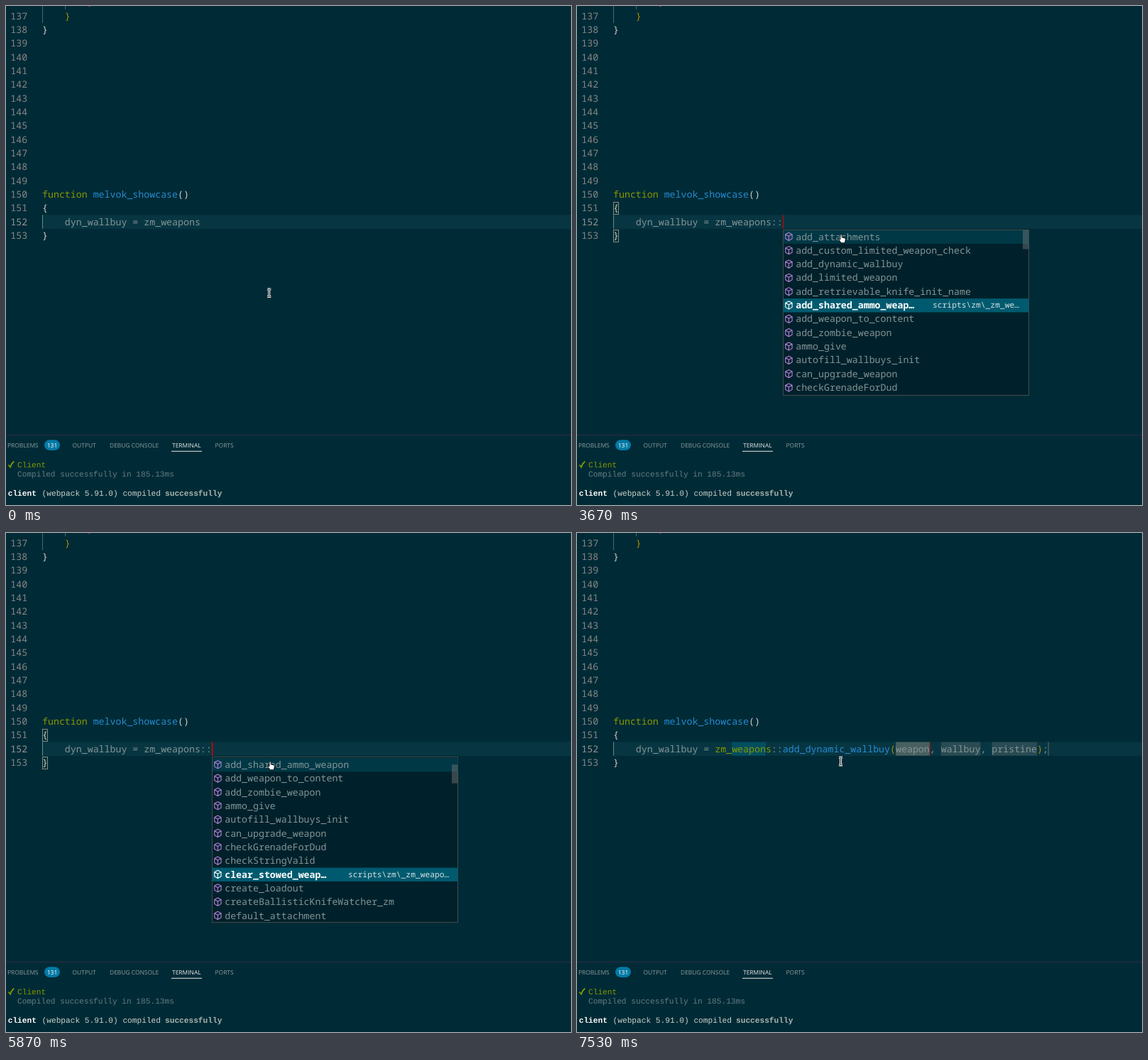
An HTML page for the animation above (8 s loop, 796 px wide and 703 px high).

```html
<!DOCTYPE html>
<html lang="en">
<head>
<meta charset="utf-8">
<title>Editor autocomplete</title>
<style>
  html, body { margin: 0; width: 100%; height: 100%; overflow: hidden; background: #002b36; }
  svg { display: block; }
  text { white-space: pre; text-rendering: geometricPrecision; }
  .code { font: 13.27px "Noto Sans Mono", monospace; fill: #839496; }
  .term { font: 11.17px "Liberation Mono", monospace; }
  .tab { font: 8.45px "Open Sans", sans-serif; fill: #8b9ca0; }
  .detail { font: 11.3px "Noto Sans Mono", monospace; fill: #d5e0e3; }
  .bold { font-weight: bold; }
  .icon { fill: none; stroke: #b180d7; stroke-width: 1.1; stroke-linejoin: round; }
  .row .back, .row .detail, .row .more { visibility: hidden; }
  .hover .back { visibility: visible; fill: #003846; }
  .picked .back { visibility: visible; fill: #005a6f; }
  .picked .code { fill: #fff; font-weight: bold; }
  .picked .icon { stroke: #fff; }
  .picked .detail { visibility: visible; }
  .picked.hover .more { visibility: visible; }
</style>
</head>
<body>
<svg id="stage" width="796" height="703" viewBox="0 0 796 703" xmlns="http://www.w3.org/2000/svg">
  <clipPath id="view"><rect x="291" y="316" width="345.5" height="232.5"/></clipPath>
</svg>
<script>
const LOOP = 8000, LEFT = 51, CHAR = 7.962, LINE = 19.33;
const LIST_TOP = 315.5, VIEW = 12 * LINE + 1.4;
const stage = document.getElementById('stage');
const GREY = '#839496', GREEN = '#859900', BLUE = '#268bd2', GOLD = '#b58900', PALE = '#cdcdcd';

function add(parent, tag, attrs = {}, content) {
  const el = document.createElementNS('http://www.w3.org/2000/svg', tag);
  for (const key in attrs) el.setAttribute(key, attrs[key]);
  if (content !== undefined) el.textContent = content;
  parent.append(el);
  return el;
}
const group = (parent, attrs) => add(parent, 'g', attrs);
const rect = (parent, x, y, width, height, fill, more) =>
  add(parent, 'rect', { x, y, width, height, fill, ...more });
const write = (parent, x, y, cls, content, fill) =>
  add(parent, 'text', { x, y, class: cls, ...(fill && { style: `fill:${fill}` }) }, content);
const show = (el, on) => el.setAttribute('visibility', on ? 'visible' : 'hidden');
const colX = col => LEFT + col * CHAR;
const lineTop = n => 294.5 + (n - 152) * LINE;

// A line of code made of [text, colour] runs
function codeLine(parent, n, col, runs) {
  const line = write(parent, colX(col), lineTop(n) + 14.2, 'code', '');
  for (const [content, fill] of runs) add(line, 'tspan', { style: `fill:${fill}` }, content);
  return line;
}

// Editor
rect(stage, LEFT, 294.3, 745, 19.6, '#073642');
for (let n = 137; n <= 153; n++)
  write(stage, 6.3, lineTop(n) + 14.2, 'code', n, n === 152 ? '#949494' : '#858585');
rect(stage, LEFT, 0, 1, 24, '#49666b');
rect(stage, 83, 0, 1, 4.5, '#49666b');
rect(stage, LEFT, 294.3, 1, 19.6, '#648b8e');

const boxes = group(stage, { fill: '#00640022', stroke: '#888' });
for (const n of [151, 153])
  add(boxes, 'rect', { x: 51.5, y: Math.round(lineTop(n)) + 1.5, width: 7, height: 17 });

codeLine(stage, 136, 8, [['}', '#d33682']]);
codeLine(stage, 137, 4, [['}', GOLD]]);
codeLine(stage, 138, 0, [['}', PALE]]);
codeLine(stage, 150, 0, [['function ', GREEN], ['melvok_showcase', BLUE], ['()', PALE]]);
codeLine(stage, 151, 0, [['{', PALE]]);
codeLine(stage, 153, 0, [['}', PALE]]);

const typed = write(stage, colX(4), lineTop(152) + 14.2, 'code', '');

// Inserted call with its placeholders
const call = group(stage);
const mark = (col, len, fill) => rect(call, colX(col), 294.5, len * CHAR, 19.2, fill);
const twin = mark(21, 6, '#024e60');
mark(50, 6, '#48605f');
mark(58, 7, '#2a4b53');
mark(67, 8, '#2a4b53');
rect(call, 663.6, 294.5, 1, 19.2, '#686d6d');
codeLine(call, 152, 4, [
  ['dyn_wallbuy = ', GREY], ['zm_weapons', GREEN], ['::', GREY], ['add_dynamic_wallbuy', BLUE],
  ['(', GOLD], ['weapon, wallbuy, pristine', GREY], [')', GOLD], [';', GREY]
]);

const caret = rect(stage, 0, 294.5, 1.6, 19.3, '#d30102');

// Panel
rect(stage, 0, 604, 796, 1, '#2b2b4a');
const tabs = [[2, 'PROBLEMS'], [93.5, 'OUTPUT'], [146, 'DEBUG CONSOLE'], [234, 'TERMINAL'], [294.5, 'PORTS']];
for (const [x, name] of tabs)
  write(stage, x, 621.7, 'tab', name, name === 'TERMINAL' ? '#e7e7e7' : '');
rect(stage, 233, 626.8, 43, 1, '#e7e7e7');
rect(stage, 54, 611.3, 22, 14.6, '#047aa6', { rx: 7.3 });
write(stage, 65, 621.8, 'tab', '131', '#fff').setAttribute('text-anchor', 'middle');

add(stage, 'path', { d: 'M3.5 646.5l2.5 3.2q1.5-5 5.2-8.2', fill: 'none', stroke: GREEN, 'stroke-width': 1.7 });
write(stage, 16, 649.6, 'term', 'Client', GREEN);
write(stage, 16, 663, 'term', 'Compiled successfully in 185.13ms', '#657b83');
write(stage, 2.7, 690, 'term bold', 'client', '#fff');
write(stage, 50.6, 690, 'term', '(webpack 5.91.0) compiled', '#c9d0cb');
write(stage, 224, 690, 'term bold', 'successfully', '#a9b5b0');

// Suggestion list
const names = `add_attachments add_custom_limited_weapon_check add_dynamic_wallbuy add_limited_weapon
  add_retrievable_knife_init_name add_shared_ammo_weapon add_weapon_to_content add_zombie_weapon
  ammo_give autofill_wallbuys_init can_upgrade_weapon checkGrenadeForDud checkStringValid
  clear_stowed_weapon create_loadout createBallisticKnifeWatcher_zm default_attachment`.split(/\s+/);
const PATH = 'scripts\\zm\\_zm_weapons';
const cut = (s, room) => s.length <= room ? s : s.slice(0, Math.max(0, Math.floor(room) - 1)) + '…';

const popup = group(stage);
rect(popup, 290.5, 315.5, 346, 233, '#00212b', { stroke: '#414a4d' });
const clip = group(popup, { 'clip-path': 'url(#view)' });
const list = group(clip);
const rows = names.map((name, i) => {
  const g = group(list, { class: 'row', transform: `translate(0 ${LIST_TOP + i * LINE})` });
  const long = name.length - 18;
  const start = long > 0 ? 475.7 + 6.33 * long : 479.3;
  rect(g, 290, 0, 347, LINE, 'none', { class: 'back' });
  add(g, 'path', {
    class: 'icon',
    d: 'M298.4 3.8l4.7 2.4v6l-4.7 2.8l-4.7-2.8v-6zM293.7 6.2l4.7 2.5l4.7-2.5M298.4 8.7v6.3'
  });
  const label = write(g, 308.2, 14, 'code', name);
  const detail = write(g, start, 13.3, 'detail', '');
  add(g, 'path', { class: 'more', d: 'M617.3 3.8l3.6 3.7l-3.6 3.7', fill: 'none', stroke: '#e8f0f2' });
  return { g, name, label, detail, start };
});
const slider = rect(popup, 628, 0, 8.5, 26.5, '#797979', { 'fill-opacity': .45 });

// Pointers
const beam = group(stage, { fill: 'none' });
for (const [stroke, width] of [['#fff', 3], ['#111', 1]])
  add(beam, 'path', { d: 'M-2.6-5.3H-.7L0-4.7L.7-5.3H2.6M0-4.7V4.7M-2.6 5.3H-.7L0 4.7L.7 5.3H2.6', stroke, 'stroke-width': width });
const hand = add(stage, 'path', {
  d: 'M371 329v-6.4q1.1-1.7 2.2 0v3.4l4 .9q1.2.5 1.1 2l-1 4.8h-5.1l-3-4.2q0-2 1.8-.5z',
  fill: '#fff', stroke: '#000', 'stroke-width': .8
});

// [time, selected item]
const presses = [
  [1400, 0], [3130, 1], [3270, 2], [3400, 3], [3530, 4], [3665, 5], [3800, 6], [3930, 7],
  [4130, 8], [4265, 9], [4330, 10], [4465, 11], [4600, 12], [4730, 13], [4865, 14], [5000, 15],
  [5130, 16], [5330, 15],
  ...[13, 11, 9, 7, 5, 3, 1].map((item, k) => [5865 + k * 66.7, item]),
  [6600, 2], [6725, 3], [6930, 2]
];
const OPEN = 1400, ACCEPT = 7465;

const clamp = v => Math.min(1, Math.max(0, v));
const ease = u => u * u * (3 - 2 * u);

function caretAlpha(t) {
  if (t >= ACCEPT) return .5;
  if (t >= 1300 && t < 1830) return 1;
  const p = (t - (t < 1300 ? -600 : 1830)) % 1000;
  const q = p < 500 ? p : 1000 - p;
  return 1 - ease(clamp((q - 100) / 200));
}

function listState(t) {
  let item = 0, scroll = 0;
  for (const [time, next] of presses) {
    if (time > t) break;
    item = next;
    scroll = Math.max(Math.min(scroll, item * LINE), (item + 1) * LINE - VIEW);
  }
  return { item, scroll };
}

function drawList(t) {
  const { item, scroll } = listState(t);
  const over = Math.floor((321.5 - LIST_TOP + scroll) / LINE);
  list.setAttribute('transform', `translate(0 ${-scroll})`);
  slider.setAttribute('y', 316 + scroll * .107);
  rows.forEach(({ g, name, label, detail, start }, i) => {
    const picked = i === item, hover = i === over;
    g.setAttribute('class', 'row' + (picked ? ' picked' : '') + (hover ? ' hover' : ''));
    label.textContent = picked ? cut(name, (start - 333) / CHAR) : name;
    detail.textContent = cut(PATH, ((hover ? 617 : 629.5) - start) / 6.79);
  });
}

function draw(t) {
  const open = t >= OPEN && t < ACCEPT, done = t >= ACCEPT;
  const colons = t < 1265 ? 0 : t < 1330 ? 1 : 2;
  typed.textContent = 'dyn_wallbuy = zm_weapons' + '::'.slice(0, colons);
  show(typed, !done);
  show(call, done);
  show(twin, t >= 7525);
  show(boxes, t >= 130 && !done);
  caret.setAttribute('x', colX(done ? 55.95 : 28 + colons));
  caret.setAttribute('opacity', caretAlpha(t));
  const move = ease(clamp((t - 70) / 560));
  beam.setAttribute('transform', `translate(${370.7 + .8 * move} ${404.2 - 82.6 * move})`);
  show(beam, !open);
  show(hand, open);
  popup.style.display = open ? '' : 'none';
  if (open) drawList(t);
}

const began = performance.now();
function tick() {
  draw((performance.now() - began) % LOOP);
  requestAnimationFrame(tick);
}
tick();
</script>
</body>
</html>
```
